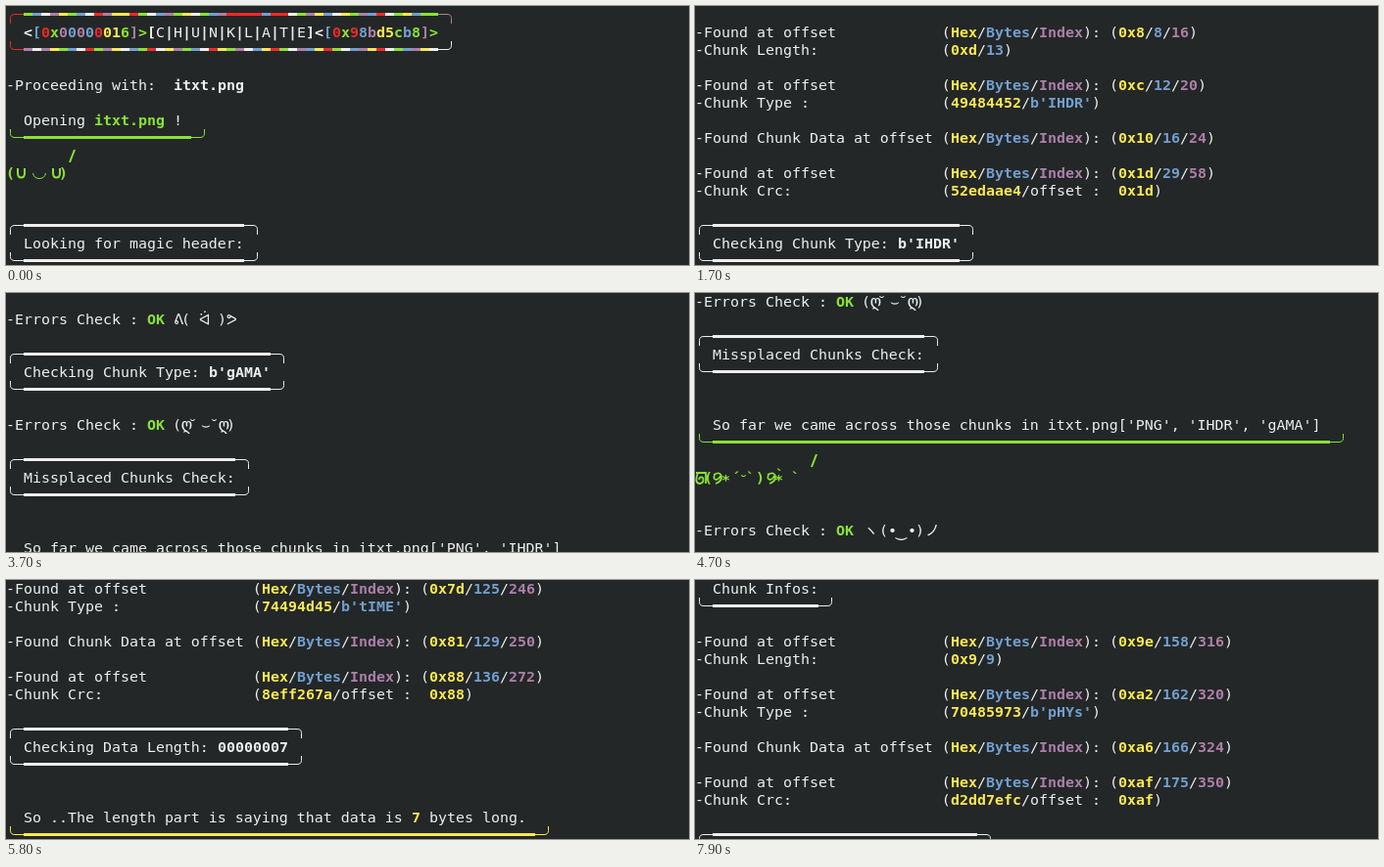
An HTML page that plays this animation: 697 by 265 pixels, repeating every 8000 ms.

```html
<!DOCTYPE html>
<html lang="en">
<head>
<meta charset="utf-8">
<title>Chunk check log</title>
<style>
html, body { margin: 0; width: 100%; height: 100%; overflow: hidden; background: #232728; }
svg { display: block; }
text { font: 14.95px "DejaVu Sans Mono", "DejaVu Sans", "Noto Sans CJK JP", monospace; white-space: pre; }
.b { font-weight: bold; }
</style>
</head>
<body>
<svg id="stage" width="697" height="265" viewBox="0 0 697 265"><g id="log"></g></svg>
<script>
const NS = "http://www.w3.org/2000/svg";
const CELL = 9, ROW = 18, LOOP = 8000;
const INK = { w: "#eeeeec", y: "#fce94f", g: "#8ae234", b: "#729fcf", p: "#ad7fa8", r: "#ef2929" };
const log = document.getElementById("log");
let row = 0;

function add(tag, attrs, text) {
  const el = document.createElementNS(NS, tag);
  for (const k in attrs) el.setAttribute(k, attrs[k]);
  if (text) el.textContent = text;
  log.append(el);
  return el;
}

function put(x, text, color = "w", bold = false, dy = 0, size = 0) {
  const el = add("text", { x, y: row * ROW + 14 + dy, fill: INK[color], class: bold ? "b" : "" }, text);
  if (size) el.style.fontSize = size + "px";
}

// "~y" starts a bold coloured run, "~." goes back to plain text
const plain = s => s.replace(/~./g, "");
function write(s) {
  let col = 0;
  s.split("~").forEach((part, i) => {
    const run = i ? part.slice(1) : part;
    const color = i && part[0] !== "." ? part[0] : "";
    if (run.trim()) put(col * CELL, run, color || "w", !!color);
    col += run.length;
  });
}
function line(s) { write(s); row++; }
function gap(n = 1) { row += n; }

function stroke(d, color, width = 1) {
  add("path", { d, fill: "none", stroke: INK[color], "stroke-width": width });
}

// one edge of a rounded box; colors may hold one letter per heavy cell
function edge(n, top, colors = "w", left = colors[0], right = left) {
  const y = row * ROW + 8.5, end = row * ROW + (top ? 18 : 0), bend = y + (top ? 4 : -4);
  const far = (n + 3) * CELL + 4.5;
  stroke(`M4.5 ${end}V${bend}Q4.5 ${y} 9 ${y}H18`, left);
  stroke(`M${far} ${end}V${bend}Q${far} ${y} ${far - 4.5} ${y}H${far - 13.5}`, right);
  if (colors.length === 1) stroke(`M18 ${y}h${n * CELL}`, colors, 3);
  else for (let i = 0; i < n; i++) stroke(`M${18 + i * CELL} ${y}h${CELL}`, colors[i], 3);
  row++;
}

function box(s) {
  const n = plain(s).length;
  edge(n, true);
  line("  " + s);
  edge(n, false);
}

// faces: lists of x, glyph, vertical shift, font size
function glyphs(list, color, bold) {
  for (const [x, ch, dy, size] of list) put(x, ch, color, bold, dy, size);
}
const FACES = {
  dance: [[171, "ᕕ"], [179, "("], [197, "ᐛ"], [216, ")"], [225, "ᕗ"]],
  love: [[170, "("], [179, "ღ", 0, 18], [186, "˘"], [199, "⌣"], [208, "˘"], [217, "ღ", 0, 18], [225, ")"]],
  cheer: [[172, "ヽ"], [188, "("], [197, "•"], [205, "‿", 1, 18], [217, "•"], [225, ")"], [235, "ノ"]],
  cool: [[144, "("], [153, "▰"], [164, "˘"], [171, "◡"], [180, "˘"], [189, "▰"], [199, ")"]],
  bear: [[153, "＼"], [171, "ʕ"], [189, "•"], [198, "ᴥ"], [207, "•"], [216, "ʔ"], [226, "／"]]
};

const calm = c => {
  const y = row * ROW;
  glyphs([[0, "("], [54, ")"]], c, true);
  for (const x of [12, 48]) stroke(`M${x} ${y + 4}v5q0 4.5 3.5 4.5t3.5 -4.5v-5`, c, 2);
  stroke(`M27.5 ${y + 9}q1 5.5 6.5 5.5t6.5 -5.5`, c);
};
const point = c => {
  const y = row * ROW;
  glyphs([[0, "☜"], [27, "▽"], [54, "☞"]], c);
  glyphs([[7, "("], [45, ")"]], c, true);
  stroke(`M18 ${y + 6}q7 -6 14 0M35 ${y + 6}q7 -6 14 0`, c, 1.6);
};
const fairy = c => {
  const y = row * ROW;
  stroke(`M1 ${y + 4}h10v11M3 ${y + 4}q-4 11 2 11q5 -1 3 -6q-3 -2 -4 2`, c, 1.8);
  glyphs([[9, "("], [27, "*", 2], [37, "´"], [45, "˘", 3], [52, "`"], [62, ")"], [81, "*", 2], [82, "`", -3], [98, "`"]], c, true);
  for (const x of [18, 73])
    stroke(`M${x + 1} ${y + 6}q7 -4 8 2q0 5 -6 7M${x + 2} ${y + 6}q-2 5 2 5q3 -1 4 -4`, c, 1.8);
};
const doubt = c => glyphs([[0, "("], [9, "•"], [27, "_"], [45, "•"], [54, ")"]], c, true);

function say(s, color, tailCol, face) {
  line("  " + s);
  edge(plain(s).length + 1, false, color);
  stroke(`M${tailCol * CELL + 2} ${row * ROW + 16}l5 -13`, color, 2);
  row++;
  face(color);
  gap(3);
}

function check(name, face) {
  write(`-${name} Check : ~gOK`);
  glyphs(FACES[face]);
  gap(2);
}

const KEY = "(~yHex~./~bBytes~./~pIndex~.): ";
const at = (n, back = 0) => `${KEY}(~y0x${n.toString(16)}~./~b${n}~./~p${n * 2 - back}~.)`;
const pair = (label, value) => line(label.padEnd(28) + value);

const seen = ["PNG"];
const starts = [];

function chunk(type, pos, len, crc, typeFirst) {
  starts.push(row);
  const hex = [...type].map(c => c.charCodeAt(0).toString(16)).join("");
  const end = pos + 8 + len;
  box("Chunk Infos:");
  gap();
  pair("-Found at offset", at(pos));
  pair("-Chunk Length:", `(~y0x${len.toString(16)}~./~b${len}~.)`);
  gap();
  pair("-Found at offset", at(pos + 4, 4));
  pair("-Chunk Type :", `(~y${hex}~./~bb'${type}'~.)`);
  gap();
  pair("-Found Chunk Data at offset", at(pos + 8, 8));
  gap();
  pair("-Found at offset", at(end));
  pair("-Chunk Crc:", `(~y${crc}~./offset :  ~y0x${end.toString(16)}~.)`);
  gap();

  const checkLength = () => {
    box(`Checking Data Length: ~w${len.toString(16).padStart(8, "0")}`);
    gap(2);
    say(`So ..The length part is saying that data is ~y${len}~. bytes long.`, "y", 7, doubt);
    check("Errors", "dance");
  };
  const checkType = () => {
    box(`Checking Chunk Type: ~wb'${type}'`);
    gap();
    check("Errors", "love");
  };
  if (typeFirst) { checkType(); checkLength(); }
  else { checkLength(); checkType(); }

  box("Missplaced Chunks Check:");
  gap(2);
  const names = seen.map(s => `'${s}'`).join(", ");
  const first = seen.length === 1;
  say(`So far we came across those chunks in itxt.png[${names}]`, "g", first ? 7 : 13, first ? point : fairy);
  check("Errors", first ? "dance" : "cheer");
  box("Check Crc Validity:");
  gap();
  check("Crc", first ? "cool" : "bear");
  seen.push(type);
}

// banner
const paint = (s, colors) => [...s].map((ch, i) => `~${colors[i]}${ch}`).join("");
const title = [..."CHUNKLATE"].map(ch => "~." + ch).join("~w|");
edge(47, true, "gbwpygbwrpyyrgwbpgywgbprrrrbrrwgpybwygpbrwgybgg", "r", "p");
line("  " + paint("<[0x00000016]>[", "wbrgpbpbryygpgw") + title + paint("]<[0x98bd5cb8]>", "wwbrgrbpyygbgpg"));
edge(47, false, "pwpygbwrgpywbgrwypgbwrygpwbyrgwpbyrgwbpyrwgbpyw", "r", "w");
gap();
line("-Proceeding with:  ~witxt.png");
gap();
say("Opening ~gitxt.png~. !", "g", 7, calm);
box("Looking for magic header:");
gap();
pair("-Found Magic at offset", at(0));
gap();

chunk("IHDR", 8, 13, "52edaae4", true);
chunk("gAMA", 33, 4, "0bfc6105");
chunk("sRGB", 49, 1, "aece1ce9");
chunk("iTXt", 62, 47, "5c1f08b3");
chunk("tIME", 121, 7, "8eff267a");
chunk("bKGD", 140, 6, "a0bda793");
chunk("pHYs", 158, 9, "d2dd7efc");

// per chunk: time in tenths of a second, first visible line
const SCROLL = [
  [0, -18, 12, -15, 13, -12, 15, -6, 16, -1, 17, 3, 20, 13, 21, 22, 22, 28, 25, 31, 26, 35, 27, 37, 28, 41],
  [30, 3, 32, 7, 33, 16, 36, 19, 37, 25, 38, 41],
  [41, 3, 42, 7, 43, 22, 45, 28, 47, 32, 48, 35, 49, 37, 50, 41],
  [52, 7, 53, 28, 55, 35],
  [58, 7, 60, 12, 62, 16, 63, 19, 64, 22, 68, 46],
  [69, 3, 70, 7, 73, 16, 74, 22, 75, 28, 78, 46],
  [79, 1]
];
const steps = SCROLL.flatMap((list, c) =>
  list.flatMap((t, i) => i % 2 ? [] : [{ t: t * 100, top: starts[c] + list[i + 1] }]));

function draw(ms) {
  const t = ms % LOOP;
  let top = 0;
  for (const s of steps) if (s.t <= t) top = s.top;
  log.setAttribute("transform", `translate(0 ${-top * ROW})`);
}

const t0 = performance.now();
function tick() {
  draw(performance.now() - t0);
  requestAnimationFrame(tick);
}
draw(0);
tick();
</script>
</body>
</html>
```
